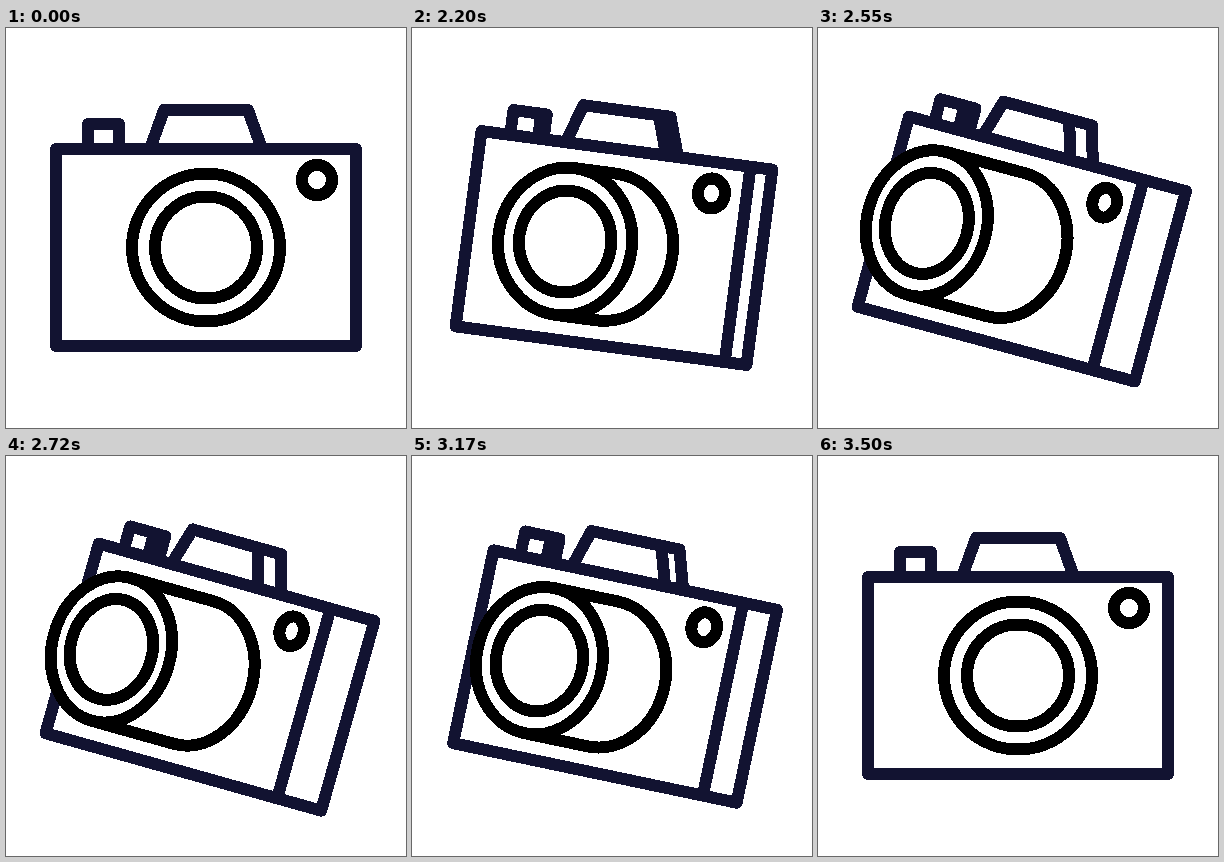
Animation of 400 by 400 pixels, one loop 3.52 s. Source, as an HTML page:

```html
<!DOCTYPE html>
<html lang="en">
<head>
<meta charset="utf-8">
<title>Camera</title>
<style>
html, body { margin: 0; height: 100%; overflow: hidden; background: #fff; }
svg { display: block; width: 100vw; height: 100vh; }
path { stroke-width: 12; stroke-linecap: round; stroke-linejoin: round; fill: none; shape-rendering: crispEdges; }
#shell { stroke: #121331; }
#lens, #ring, #flash { stroke: #000; fill: #fff; }
</style>
</head>
<body>
<svg viewBox="0 0 400 400">
  <g id="camera">
    <path id="shell"/>
    <path id="flash"/>
    <path id="lens"/>
    <path id="ring"/>
  </g>
</svg>
<script>
const LOOP = 3520, START = 1998, HALF = 750, TILT = 15.7;
const el = id => document.getElementById(id);

const bezier = (s, a, b) => 3 * (1 - s) ** 2 * s * a + 3 * (1 - s) * s * s * b + s ** 3;

function ease(x) {
  let lo = 0, hi = 1;
  for (let i = 0; i < 24; i++) {
    const mid = (lo + hi) / 2;
    if (bezier(mid, .25, .18) < x) lo = mid; else hi = mid;
  }
  return bezier(lo, .04, 1);
}

const line = (...points) => 'M' + points.map(p => p.join(' ')).join('L');
const ellipse = (x, y, rx, ry) =>
  `M${x - rx} ${y}a${rx} ${ry} 0 1 1 ${2 * rx} 0a${rx} ${ry} 0 1 1 ${-2 * rx} 0Z`;

// turn: 0 faces the viewer, 1 is fully turned
function draw(turn) {
  const squash = 1 - .198 * turn;
  const front = x => -18.7 * turn + x * squash;
  const bottom = 98.5, top = -98.5, hump = -137.5, knob = -123.5;
  const left = front(-150), right = front(150), back = right + 45.7 * turn;
  const humpSide = 24.5 * turn, knobSide = 11.5 * turn;

  el('camera').setAttribute('transform',
    `translate(200 ${219.5 + .5 * turn}) rotate(${TILT * turn})`);
  el('shell').setAttribute('d',
    line([left, top], [back, top], [back, bottom], [left, bottom]) + 'Z' +
    line([right, top], [right, bottom]) +
    line([front(-56), top], [front(-42), hump], [front(42) + humpSide, hump], [front(56) + humpSide, top]) +
    line([front(42), hump], [front(56), top]) +
    line([front(-118), top], [front(-118), knob], [front(-87) + knobSide, knob], [front(-87) + knobSide, top]) +
    line([front(-87), knob], [front(-87), top]));
  el('flash').setAttribute('d', ellipse(front(111), -67.5 + 1.3 * turn, 15 * squash, 15));

  const near = -98.3 * turn, far = -12.5 * turn, rx = 74 * squash;
  el('lens').setAttribute('d',
    `M${near} -74H${far}A${rx} 74 0 0 1 ${far} 74H${near}Z` + ellipse(near, 0, rx, 74));
  el('ring').setAttribute('d', ellipse(near, 0, rx, 74) + ellipse(near, 0, 51 * squash, 51));
}

function frame() {
  const t = performance.now() % LOOP - START;
  const x = 1 - Math.abs(t - HALF) / HALF;
  draw(x > 0 ? ease(x) : 0);
  requestAnimationFrame(frame);
}
frame();
</script>
</body>
</html>
```
